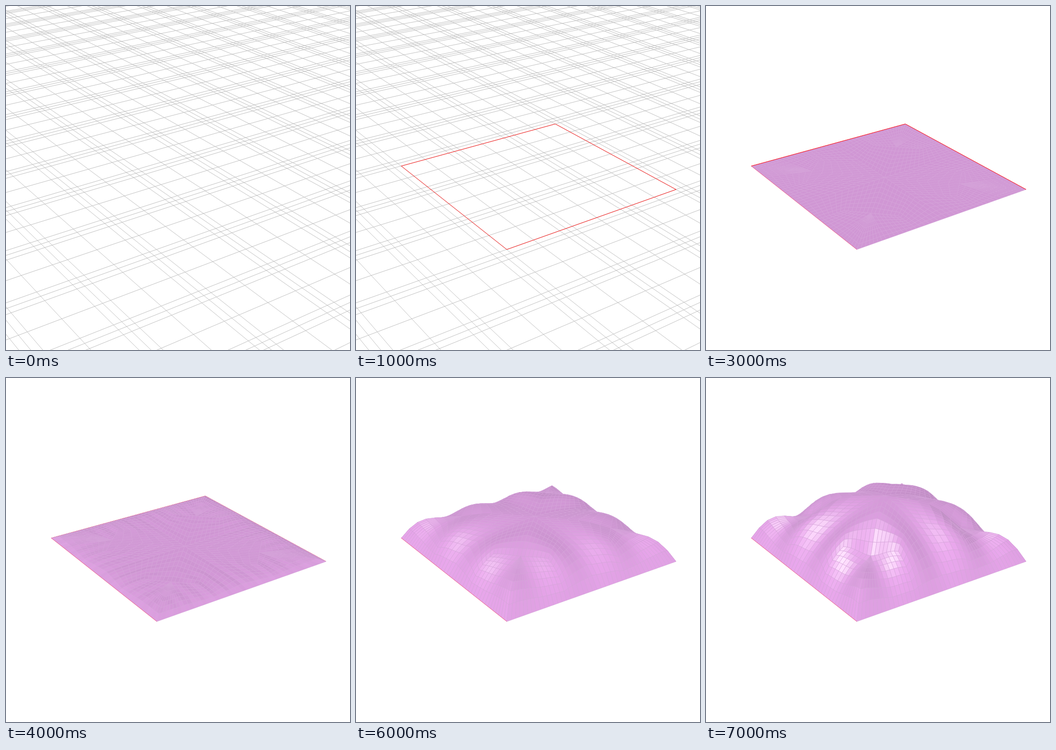
An HTML page with a canvas for the animation above (8000 ms loop, 748 px wide and 748 px high).

```html
<!DOCTYPE html>
<html lang="en">
<head>
<meta charset="utf-8">
<title>Inflating surface</title>
<style>
  html, body { margin: 0; height: 100%; overflow: hidden; background: #fff; }
  canvas { display: block; }
</style>
</head>
<body>
<canvas id="stage" width="748" height="748"></canvas>
<script>
const ctx = document.getElementById('stage').getContext('2d');
const STEP = 1000, STEPS = 8, CELLS = 7;

// Perspective of the unit square (u, v) with height z; returns [x, y, depth].
function project([u, v, z = 0]) {
  const w = 1 + 0.11587 * u - 0.17233 * v - 0.1038 * z;
  return [
    (98 + 385.17 * u + 173.06 * v - 38.8 * z) / w,
    (347.5 - 61.84 * u + 90.34 * v - 412 * z) / w,
    w
  ];
}

function path(points, close) {
  ctx.beginPath();
  for (const p of points) ctx.lineTo(p[0], p[1]);
  if (close) ctx.closePath();
}

function line(points, color, width = 1, close = false) {
  path(points.map(project), close);
  ctx.strokeStyle = color;
  ctx.lineWidth = width;
  ctx.stroke();
}

// One eighth of the square, split into four patches.
const corner = [0, 0], edge1 = [0.155, 0], edge2 = [0.323, 0], middle = [0.5, 0];
const hub = [0.232, 0.232], knee = [0.323, 0.142], neck = [0.5, 0.285], center = [0.5, 0.5];
const octant = [
  [corner, edge1, hub, hub],
  [edge1, edge2, knee, hub],
  [edge2, middle, neck, knee],
  [hub, knee, neck, center]
];

function mirror([x, y], i) {
  if (i & 1) [x, y] = [y, x];
  return [i & 2 ? 1 - x : x, i & 4 ? 1 - y : y];
}

const patches = [];
for (let i = 0; i < 8; i++)
  for (const patch of octant) patches.push(patch.map(p => mirror(p, i)));

const square = [[0, 0], [1, 0], [1, 1], [0, 1]];

// Plateau height and sharpness, dome height, wave and ripple amplitude, depth of the hub dents.
const shapes = {
  3: { plateau: 0, sharp: 8, dome: 0, wave: 0, ripple: 0, dent: 0 },
  4: { plateau: 0.018, sharp: 12, dome: 0, wave: 0.001, ripple: 0.002, dent: 0 },
  5: { plateau: 0.087, sharp: 9, dome: 0, wave: 0.008, ripple: 0.0056, dent: 0 },
  6: { plateau: 0.152, sharp: 6, dome: 0.032, wave: 0.02, ripple: 0, dent: 0 },
  7: { plateau: 0.155, sharp: 6, dome: 0.14, wave: 0.036, ripple: 0, dent: 0.033 }
};

function height(u, v, s) {
  const p = Math.abs(2 * u - 1), q = Math.abs(2 * v - 1);
  const m = Math.max(p, q), n = Math.min(p, q);
  const plateau = 1 - m ** s.sharp;
  const dome = ((1 - p * p) * (1 - q * q)) ** 1.5;
  const wave = -m * Math.cos(3.4 * Math.PI * n);
  const ripple = -m * Math.cos(14 * Math.PI * n);
  const dent = Math.exp(-((p - 0.536) ** 2 + (q - 0.536) ** 2) / 0.03);
  return plateau * (s.plateau + s.wave * wave + s.ripple * ripple - s.dent * dent)
    + s.dome * dome;
}

const sub = (a, b) => a.map((x, i) => x - b[i]);

function shade([a, b, c, d]) {
  const e = sub(c, a), f = sub(d, b);
  const normal = [e[1] * f[2] - e[2] * f[1], e[2] * f[0] - e[0] * f[2], e[0] * f[1] - e[1] * f[0]];
  const size = Math.hypot(...normal) * Math.sign(normal[2] || 1) || 1;
  const [x, y, z] = normal.map(k => k / size);
  const light = -0.66 * x + 0.57 * y + 0.5 * z;
  const gloss = Math.max(-0.55 * x + 0.42 * y + 0.72 * z, 0) ** 30;
  return `rgb(${174 + 68 * light + 18 * gloss},${130 + 42 * light + 62 * gloss},${179 + 66 * light + 14 * gloss})`;
}

function drawMesh(s) {
  const faces = [];
  for (const [a, b, c, d] of patches) {
    const at = (i, j) => {
      const x = i / CELLS, y = j / CELLS;
      const [u, v] = [0, 1].map(k =>
        (a[k] * (1 - x) + b[k] * x) * (1 - y) + (d[k] * (1 - x) + c[k] * x) * y);
      return [u, v, height(u, v, s)];
    };
    for (let i = 0; i < CELLS; i++)
      for (let j = 0; j < CELLS; j++) {
        const quad = [at(i, j), at(i + 1, j), at(i + 1, j + 1), at(i, j + 1)];
        const points = quad.map(project);
        faces.push({ points, color: shade(quad), depth: points.reduce((sum, p) => sum + p[2], 0) });
      }
  }
  faces.sort((f, g) => g.depth - f.depth);
  ctx.strokeStyle = '#d5a2d9';
  ctx.lineWidth = 0.7;
  for (const face of faces) {
    path(face.points, true);
    ctx.fillStyle = face.color;
    ctx.fill();
    ctx.stroke();
  }
}

// Single lines alternate with groups of three.
function drawGrid() {
  const period = 1 / 2.8;
  for (let k = -13; k <= 13; k++)
    for (const offset of [0, 0.4, 0.5, 0.6]) {
      const c = 0.499 + (k + offset) * period;
      if (c > -2 && c < 4.6) line([[c, -4.5], [c, 2.5]], '#bebebe');
      if (c > -4.5 && c < 2.5) line([[-2, c], [4.6, c]], '#bebebe');
    }
}

function draw(step) {
  ctx.setTransform(1, 0, 0, 1, 0, 0);
  ctx.fillStyle = '#fff';
  ctx.fillRect(0, 0, 748, 748);
  ctx.translate(0.5, 0.5);
  ctx.lineJoin = 'round';
  if (step < 2) drawGrid();
  if (step === 2) for (const patch of patches) line(patch, '#c03a3a', 0.6, true);
  if (step === 1 || step === 2) line(square, '#ff1010', 1, true);
  if (step > 2) {
    const back = square.slice(0, 3);
    line(back, '#ff1010');
    drawMesh(shapes[step]);
    if (step === 3) line(back, '#ff1010');
    line([square[0], square[3]], 'rgba(255,50,90,0.75)', 0.9);
  }
}

let shown = -1;
function tick() {
  const step = Math.floor(performance.now() / STEP) % STEPS;
  if (step !== shown) draw(shown = step);
  requestAnimationFrame(tick);
}
tick();
</script>
</body>
</html>
```
